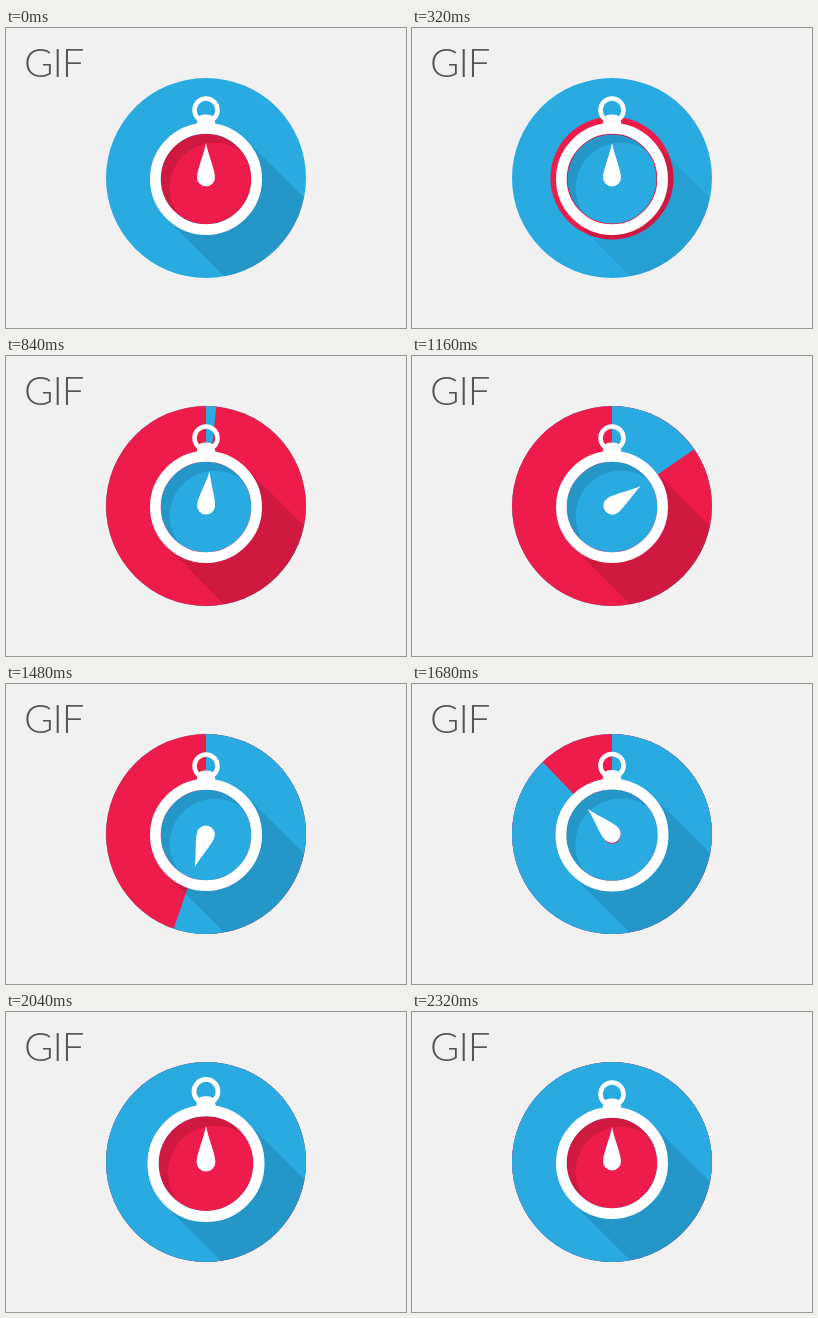
Animation, 400 px wide and 300 px high, one loop 3160 ms. Source, as an HTML page with a canvas:

```html
<!DOCTYPE html>
<html lang="en">
<head>
<meta charset="utf-8">
<title>Stopwatch</title>
<style>
  html, body { margin: 0; width: 100%; height: 100%; overflow: hidden; background: #f1f1f1; }
  canvas { display: block; }
</style>
</head>
<body>
<canvas id="stage" width="400" height="300"></canvas>
<script>
const ctx = document.getElementById('stage').getContext('2d');
const LOOP = 3160, STEP = 40, TAU = Math.PI * 2;
const BLUE = '#29abe2', RED = '#ed1c4a', WHITE = '#fff';
const CX = 200, CY = 150, DISC = 100;
const BODY = { y: 151, outer: 56, dial: 45.3 };
const PIVOT_Y = 138;

const progress = (t, from, to) => Math.min(1, Math.max(0, (t - from) / (to - from)));
const smooth = p => (1 - Math.cos(Math.PI * p)) / 2;

// Bezier easing with flat ends and handles at x1 and x2.
function easeBetween(x, x1, x2) {
  let low = 0, high = 1;
  for (let i = 0; i < 24; i++) {
    const u = (low + high) / 2, v = 1 - u;
    if (3 * u * v * v * x1 + 3 * u * u * v * x2 + u ** 3 < x) low = u;
    else high = u;
  }
  return low * low * (3 - 2 * low);
}

function circlePath(x, y, r) {
  ctx.beginPath();
  ctx.arc(x, y, r, 0, TAU);
}

function disc(x, y, r, color) {
  circlePath(x, y, r);
  ctx.fillStyle = color;
  ctx.fill();
}

function scaleWatch(scale) {
  ctx.translate(CX, PIVOT_Y);
  ctx.scale(scale, scale);
  ctx.translate(-CX, -PIVOT_Y);
}

function longShadow(clipRadius, scale, alpha) {
  ctx.save();
  circlePath(CX, CY, clipRadius);
  ctx.clip();
  scaleWatch(scale);
  ctx.translate(CX, BODY.y);
  ctx.rotate(Math.PI / 4);
  ctx.fillStyle = `rgba(0,0,0,${alpha})`;
  ctx.fillRect(0, -BODY.outer, 200, BODY.outer * 2);
  ctx.restore();
}

function sector(degrees) {
  if (degrees <= 0) return;
  const top = -Math.PI / 2;
  ctx.beginPath();
  ctx.moveTo(CX, CY);
  ctx.arc(CX, CY, DISC, top, top + degrees * Math.PI / 180);
  ctx.closePath();
  ctx.fillStyle = BLUE;
  ctx.fill();
}

function background(t, degrees, scale) {
  disc(CX, CY, DISC, BLUE);
  const spread = smooth(progress(t, 120, 665));
  if (degrees >= 360 || spread === 0) {
    longShadow(DISC, scale, 0.12);
    return;
  }
  longShadow(DISC, scale, 0.12 * (1 - progress(t, 200, 480)));
  const radius = BODY.dial + (DISC - BODY.dial) * spread;
  disc(CX, CY, radius, RED);
  sector(degrees);
  longShadow(radius, scale, 0.12);
}

function dialFace(t) {
  const { y, dial } = BODY;
  const blueGrowth = smooth(progress(t, 40, 360));
  const redGrowth = smooth(progress(t, 1600, 1880));
  ctx.save();
  circlePath(CX, y, dial);
  ctx.clip();
  disc(CX, y, dial + 1, RED);
  disc(CX, y, (dial + 1) * blueGrowth, BLUE);
  disc(CX, y, redGrowth === 1 ? dial + 1 : dial * redGrowth, RED);

  // Inner shade cast by the rim.
  ctx.beginPath();
  ctx.rect(100, 50, 200, 200);
  ctx.arc(CX + 9, y + 9, dial, 0, TAU);
  ctx.fillStyle = 'rgba(0,0,0,0.12)';
  ctx.fill('evenodd');
  ctx.restore();
}

function casing() {
  circlePath(CX, 82, 11.5);
  ctx.lineWidth = 4.5;
  ctx.strokeStyle = WHITE;
  ctx.stroke();

  ctx.beginPath();
  ctx.moveTo(190, 98);
  ctx.lineTo(192, 90);
  ctx.quadraticCurveTo(193, 86.5, 200, 86.5);
  ctx.quadraticCurveTo(207, 86.5, 208, 90);
  ctx.lineTo(210, 98);
  ctx.closePath();
  ctx.fillStyle = WHITE;
  ctx.fill();

  const width = BODY.outer - BODY.dial;
  circlePath(CX, BODY.y, BODY.dial + width / 2);
  ctx.lineWidth = width;
  ctx.stroke();
}

function needle(degrees) {
  ctx.save();
  ctx.translate(CX, CY);
  ctx.rotate(degrees * Math.PI / 180);
  ctx.beginPath();
  ctx.moveTo(0, -35);
  ctx.bezierCurveTo(2, -24, 9, -8, 9, -0.5);
  ctx.arc(0, -0.5, 9, 0, Math.PI);
  ctx.bezierCurveTo(-9, -8, -2, -24, 0, -35);
  ctx.fillStyle = WHITE;
  ctx.fill();
  ctx.restore();
}

function label() {
  ctx.font = '300 40px Lato, sans-serif';
  ctx.letterSpacing = '-1px';
  ctx.fillStyle = '#555';
  ctx.fillText('GIF', 18, 49);
}

function draw(t) {
  const degrees = 360 * easeBetween(progress(t, 653, 1913), 0.708, 0.645);
  const pulse = smooth(progress(t, 1640, 1840)) - smooth(progress(t, 1840, 2240));
  const scale = 1 + 0.09 * pulse;

  ctx.fillStyle = '#f1f1f1';
  ctx.fillRect(0, 0, 400, 300);
  label();
  background(t, degrees, scale);

  ctx.save();
  scaleWatch(scale);
  dialFace(t);
  casing();
  needle(degrees);
  ctx.restore();
}

const start = performance.now();
function tick() {
  const t = (performance.now() - start) % LOOP;
  draw(Math.floor(t / STEP) * STEP);
  requestAnimationFrame(tick);
}
tick();
</script>
</body>
</html>
```
